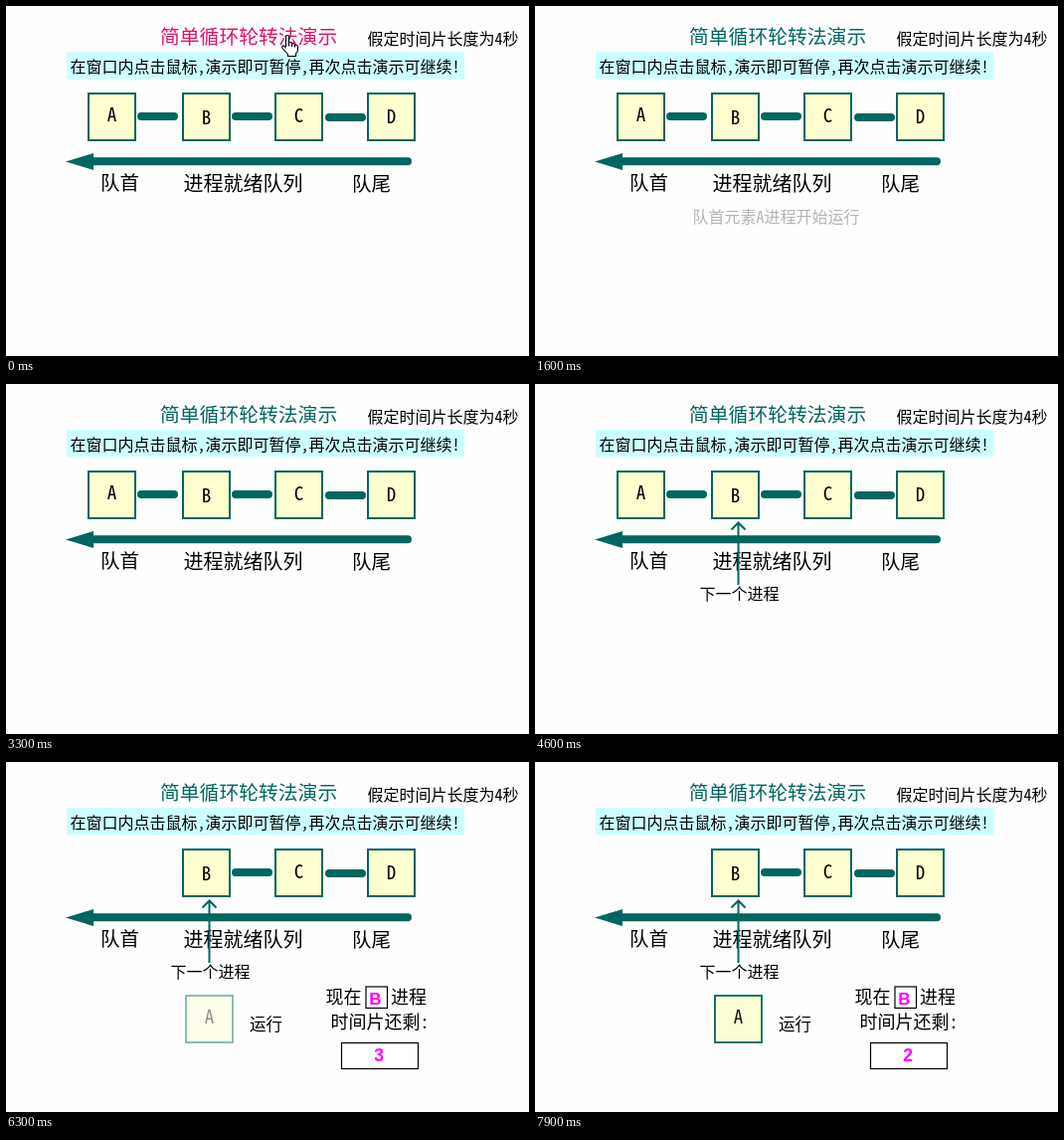
An HTML page for the animation above (8000 ms loop, 526x352 px).

```html
<!DOCTYPE html>
<html lang="zh-CN">
<head>
<meta charset="utf-8">
<title>循环轮转法</title>
<style>
  html, body { margin: 0; width: 100%; height: 100%; overflow: hidden; background: #fefefe; }
  svg { display: block; width: 526px; height: 352px; }
  text { font-family: "Noto Sans Mono CJK SC", "Noto Sans CJK SC", "Noto Sans CJK", sans-serif; white-space: pre; }
  .num { font-family: "Liberation Sans", Arial, sans-serif; font-weight: bold; fill: #f0f; text-anchor: middle; }
  .letter { font-size: 19px; text-anchor: middle; }
  .frame { fill: #fff; stroke: #000; stroke-width: 1.2; }
</style>
</head>
<body>
<svg id="stage" viewBox="0 0 526 352"></svg>
<script>
const LOOP = 8000, STEP = 100;
const TEAL = '#006660';
const stage = document.getElementById('stage');

function add(tag, attrs, parent = stage, content) {
  const node = document.createElementNS('http://www.w3.org/2000/svg', tag);
  for (const key in attrs) node.setAttribute(key, attrs[key]);
  if (content !== undefined) node.textContent = content;
  return parent.appendChild(node);
}

const group = () => add('g', {});

// Full-width characters advance 1em, ASCII half of that.
function label(str, x, midY, size, fill = '#000', parent = stage) {
  let at = x;
  const xs = [...str].map(ch => {
    const here = at;
    at += ch < '\x7f' ? size / 2 : size;
    return here;
  });
  return add('text', { x: xs.join(' '), y: midY + size * 0.38, 'font-size': size, fill }, parent, str);
}

function card(name, x, y, letterY, parent = stage) {
  add('rect', { x, y, width: 47, height: 47, fill: '#ffffd0', stroke: TEAL, 'stroke-width': 2 }, parent);
  add('text', { x: x + 23.5, y: letterY + 7, class: 'letter' }, parent, name);
}

const link = (x, y, parent = stage) => add('path', {
  d: `M${x + 4} ${y}h33`, stroke: TEAL, 'stroke-width': 8, 'stroke-linecap': 'round'
}, parent);

// Heading and notes
const title = label('简单循环轮转法演示', 155, 30, 19.8);
label('假定时间片长度为4秒', 363.5, 33, 16);
add('rect', { x: 61, y: 46, width: 400, height: 27.5, fill: '#cff' });
label('在窗口内点击鼠标,演示即可暂停,再次点击演示可继续!', 64.5, 60.5, 16);

// Ready queue
const head = group();
card('A', 83, 88, 108.5, head);
link(132, 111, head);
card('B', 178, 88, 111.5);
link(227, 111);
card('C', 271, 88, 110);
link(321, 112);
card('D', 364, 88, 111);
add('path', { d: 'M60 156.5L88 148V152.3H404a4 4 0 0 1 0 8H88V165Z', fill: TEAL });
label('队首', 95, 178, 19.5);
label('进程就绪队列', 178.5, 178.5, 20);
label('队尾', 348, 179, 19.5);

const notice = label('队首元素A进程开始运行', 158.5, 212, 16, '#222');

// Pointer to the next process
const next = group();
add('path', { d: 'M204.5 140V202M197.5 146.5L204.5 139.5L211.5 146.5', fill: 'none', stroke: TEAL, 'stroke-width': 2 }, next);
label('下一个进程', 165.5, 210.5, 16, '#000', next);

// Running process and its time slice
const running = group();
card('A', 181, 235, 256, running);
const panel = group();
label('运行', 245, 264, 16.5, '#000', panel);
label('现在', 321.5, 236.5, 18, '#000', panel);
label('进程', 387, 236.5, 18, '#000', panel);
label('时间片还剩:', 326.5, 261.5, 18, '#000', panel);
add('rect', { x: 362, y: 226, width: 21.5, height: 21.5, class: 'frame' }, panel);
add('text', { x: 371.5, y: 243.5, class: 'num', 'font-size': 17 }, panel, 'B');
add('rect', { x: 337.5, y: 282.5, width: 77, height: 26, class: 'frame' }, panel);
const count = add('text', { x: 375, y: 301, class: 'num', 'font-size': 17.5 }, panel);

const hand = add('path', {
  d: 'M4.5 12V2Q4.5 .5 6 .5T7.5 2V7.5Q10.5 6.5 10.5 9Q13.5 8 13.5 10.5Q16.5 9.5 16.5 12V15Q16.5 17.5 14.5 19V21.5H6.5V19.5L1 13.5Q0 11.5 1.5 11T4.5 13.5M7.5 7.5V11.5M10.5 9V12M13.5 10.5V12.5',
  fill: '#fff', stroke: '#000', 'stroke-width': 1.1, 'stroke-linejoin': 'round'
});

const clamp = v => Math.min(1, Math.max(0, v));
const show = (node, on) => node.setAttribute('visibility', on ? 'visible' : 'hidden');

function render(ms) {
  const t = Math.floor(ms / STEP) * STEP;
  const hover = t < 1000;
  title.setAttribute('fill', hover ? '#e0106c' : TEAL);
  show(hand, t < 1100);
  hand.setAttribute('transform', hover ? 'translate(277 29)' : 'translate(383 33)');

  const fade = t < 2650 ? (t - 1100) / 1500 : (3300 - t) / 700;
  notice.setAttribute('opacity', clamp(fade));

  show(head, t < 5500);
  show(next, t >= 4500);
  show(panel, t >= 5500);
  show(running, t >= 5500);
  running.setAttribute('opacity', clamp(0.25 + (t - 5700) * 0.0003));
  count.textContent = t < 6300 ? 4 : t < 7100 ? 3 : 2;
}

const start = performance.now();
function tick() {
  render((performance.now() - start) % LOOP);
  requestAnimationFrame(tick);
}
tick();
</script>
</body>
</html>
```
